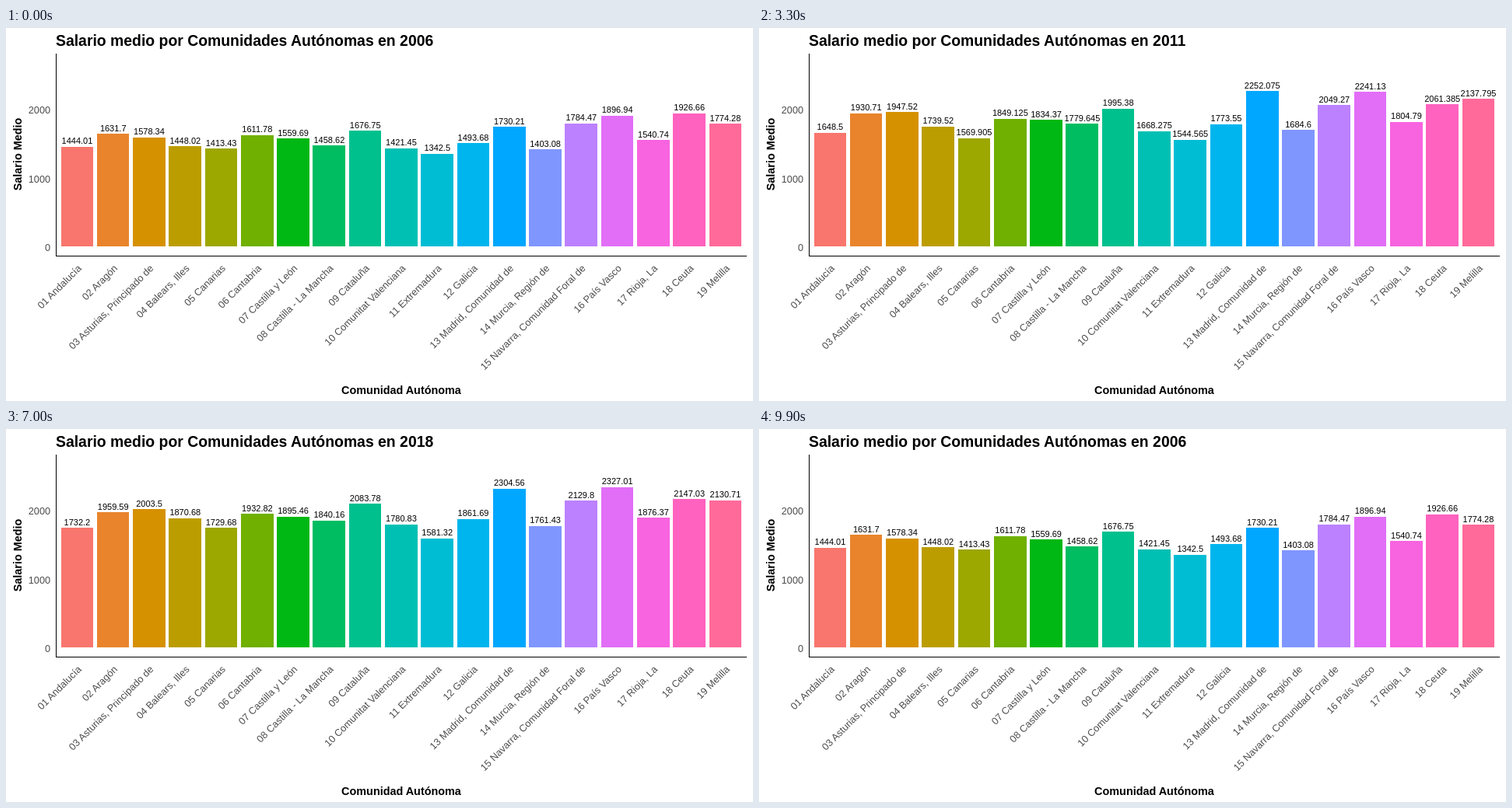
An HTML page that plays this animation: 960 px wide and 480 px high, repeating every 10 s.

```html
<!DOCTYPE html>
<html lang="es">
<head>
<meta charset="utf-8">
<title>Salario medio</title>
<style>
html, body { margin: 0; width: 100%; height: 100%; overflow: hidden; background: #fff; }
svg { display: block; width: 960px; height: 480px; font-family: "Liberation Sans", Arial, sans-serif; }
.bold { font-weight: bold; }
.axis { font-size: 14.4px; text-anchor: middle; }
.tick { font-size: 12.7px; fill: #4d4d4d; text-anchor: end; }
.value { font-size: 11px; text-anchor: middle; }
rect { shape-rendering: crispEdges; }
</style>
</head>
<body>
<svg id="stage" viewBox="0 0 960 480" xmlns="http://www.w3.org/2000/svg"></svg>
<script>
const FIRST = 2006, MIDDLE = 2015, LAST = 2021, YEARS = 17;
const BASE = 281, SCALE = .0885, LEFT = 71, STEP = 46.28, BAR = 41.65;

// Name and salary in the first, middle and last key year.
const regions = [
  ["Andalucía", 1444.01, 1653.89, 1860.56],
  ["Aragón", 1631.7, 1938.59, 1994.02],
  ["Asturias, Principado de", 1578.34, 1957.25, 2079.31],
  ["Balears, Illes", 1448.02, 1747.2, 2073.06],
  ["Canarias", 1413.43, 1574.03, 1984.8],
  ["Cantabria", 1611.78, 1855.38, 2059.75],
  ["Castilla y León", 1559.69, 1841.61, 1983.71],
  ["Castilla - La Mancha", 1458.62, 1788.11, 1925.46],
  ["Cataluña", 1676.75, 2003.78, 2214.91],
  ["Comunitat Valenciana", 1421.45, 1674.78, 1954.64],
  ["Extremadura", 1342.5, 1549.89, 1632.83],
  ["Galicia", 1493.68, 1780.93, 1994.06],
  ["Madrid, Comunidad de", 1730.21, 2265.83, 2368.05],
  ["Murcia, Región de", 1403.08, 1692.02, 1875.2],
  ["Navarra, Comunidad Foral de", 1784.47, 2056.25, 2250.35],
  ["País Vasco", 1896.94, 2250.2, 2452.89],
  ["Rioja, La", 1540.74, 1811.75, 1982.28],
  ["Ceuta", 1926.66, 2064.94, 2281.58],
  ["Melilla", 1774.28, 2147.38, 2103.4]
];

const mix = (a, b, p) => a + (b - a) * p;
const round = (v, n) => +v.toFixed(n);

// Fast growth that levels off by the middle year, then a slow recovery.
function salary(year, [, first, middle, last]) {
  const rise = 1 - ((MIDDLE - year) / (MIDDLE - FIRST)) ** 4;
  const recovery = ((year - MIDDLE) / (LAST - MIDDLE)) ** 1.4;
  return round(year < MIDDLE ? mix(first, middle, rise) : mix(middle, last, recovery), 2);
}

// Polar LUV to sRGB with chroma 100 and luminance 65.
function hue(deg) {
  const C = 100, L = 65, h = deg * Math.PI / 180;
  const Y = ((L + 16) / 116) ** 3;
  const u = C * Math.cos(h) / (13 * L) + .19784;
  const v = C * Math.sin(h) / (13 * L) + .46834;
  const X = 9 * Y * u / (4 * v), Z = 3 * Y / v - 5 * Y - X / 3;
  const gamma = c => c > .00304 ? 1.055 * c ** (1 / 2.4) - .055 : 12.92 * c;
  const byte = c => Math.round(255 * Math.min(Math.max(gamma(c), 0), 1));
  return `rgb(${byte(3.2405 * X - 1.5372 * Y - .4985 * Z)},` +
    `${byte(-.9693 * X + 1.876 * Y + .0416 * Z)},${byte(.0556 * X - .204 * Y + 1.0573 * Z)})`;
}

const stage = document.getElementById("stage");
function add(tag, attrs, text) {
  const el = document.createElementNS(stage.namespaceURI, tag);
  for (const k in attrs) el.setAttribute(k, attrs[k]);
  if (text) el.textContent = text;
  return stage.appendChild(el);
}

add("rect", { width: 960, height: 480, fill: "#fff" });
const title = add("text", { x: 64, y: 23, class: "bold", "font-size": 19.4 });
add("text", { x: 508, y: 471, class: "bold axis" }, "Comunidad Autónoma");
add("text", { transform: "translate(20 162.5) rotate(-90)", class: "bold axis" }, "Salario Medio");
[0, 1000, 2000].forEach(v => add("text", { x: 57, y: 287 - v * SCALE, class: "tick" }, String(v)));

const bars = regions.map((region, i) => {
  const x = LEFT + STEP * i, left = Math.floor(x), right = Math.floor(x + BAR);
  const mid = x + BAR / 2 - .4;
  const label = String(i + 1).padStart(2, "0") + " " + region[0];
  add("text", { transform: `translate(${mid + 6.2} 310) rotate(-45)`, class: "tick" }, label);
  return {
    pay: Array.from({ length: YEARS }, (_, y) => salary(FIRST + y, region)),
    rect: add("rect", { x: left, width: right - left, fill: hue(15 + 360 * i / regions.length) }),
    value: add("text", { x: mid, class: "value" })
  };
});
add("rect", { x: 64, y: 33, width: 1, height: 261 });
add("rect", { x: 64, y: 293, width: 888, height: 1 });

// Each move takes four ticks of 100 ms, two of them only three.
const start = k => 6 * k + (k < 9 ? 2 : 1);
const steps = k => k === 8 || k === 16 ? 3 : 4;

let shown = -1;
function draw(ms) {
  const tick = Math.floor(ms / 100) % 100;
  if (tick === shown) return;
  shown = tick;
  let k = 0;
  while (k < YEARS - 1 && tick >= start(k + 1)) k++;
  const n = steps(k);
  const p = Math.min(Math.max((tick - start(k) + 1) / n, 0), 1);
  const next = (k + 1) % YEARS;
  title.textContent = "Salario medio por Comunidades Autónomas en " + (FIRST + (p > .5 ? next : k));
  for (const { pay, rect, value } of bars) {
    const v = mix(pay[k], pay[next], p);
    const top = BASE - v * SCALE, edge = Math.floor(top);
    rect.setAttribute("y", edge);
    rect.setAttribute("height", BASE - edge);
    value.setAttribute("y", Math.round(top - 4));
    value.textContent = round(v, n === 3 ? 3 : 4);
  }
}

const t0 = performance.now();
function loop() {
  draw(performance.now() - t0);
  requestAnimationFrame(loop);
}
loop();
</script>
</body>
</html>
```
